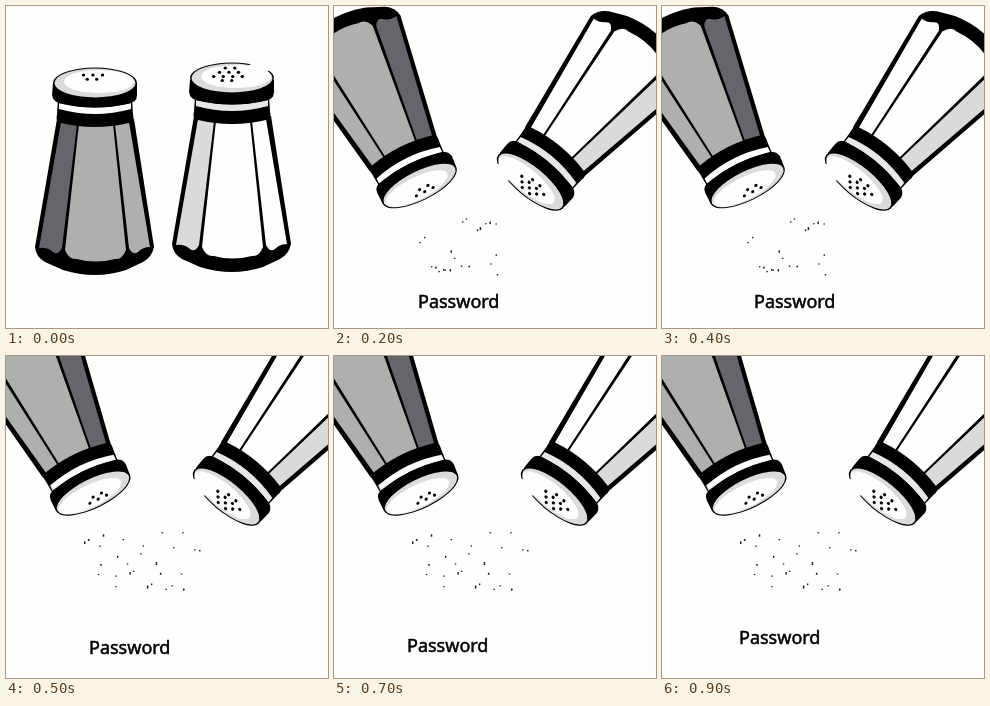
An HTML page with a canvas for the animation above (1 s loop, 322 px wide and 322 px high).

```html
<!DOCTYPE html>
<html lang="en">
<head>
<meta charset="utf-8">
<title>Salt and pepper</title>
<style>
html, body { margin: 0; width: 100%; height: 100%; overflow: hidden; background: #fefefc; }
canvas { display: block; }
</style>
</head>
<body>
<canvas id="stage" width="322" height="322"></canvas>
<script>
const ctx = document.getElementById('stage').getContext('2d');
const PAPER = '#fefefc';
const STEP = 100, STEPS = 10;

const pepper = { side: '#68646c', body: '#adb0ad', ring: PAPER, rows: [3, 2], top: -8 };
const salt = { side: '#d8dbd8', body: PAPER, ring: '#e6e8e6', rows: [2, 3, 4, 2], top: -12, worn: true };

// Each shaker: lid centre x, y, turn in degrees, scale.
const upright = { pepper: [89, 77, 0, 1], salt: [226, 74, 0, 1] };
const tipping = { pepper: [107.5, 183, 130, 0.98], salt: [190, 192.5, 231.5, 1] };
const low = {
  pepper: [85.5, 179.5, 153.5, 0.98], salt: [198, 174, 219.5, 1],
  grains: scatter(22, 7, 78, 98, 209, 62)
};
const high = {
  pepper: [87, 137, 154, 0.98], salt: [222, 139, 219.5, 1],
  grains: scatter(28, 3, 71, 127, 172, 72)
};

// Word position: step, x, baseline.
const wordKeys = [[1, 244, 294], [2, 84, 302], [4, 92, 302], [6, 73, 293], [8, 73, 299], [9, 77, 288]];

function random(seed) {
  return () => (seed = (seed * 16807) % 2147483647) / 2147483647;
}

// Grains spread evenly across, at random heights, drawing together as they fall.
function scatter(count, seed, left, width, top, height) {
  const rnd = random(seed * 7919);
  return Array.from({ length: count }, (_, i) => {
    const fall = rnd();
    const across = (i + rnd()) / count - 0.5;
    return {
      x: left + width * (0.5 + across * (1 - 0.25 * fall)),
      y: top + height * fall,
      h: 1.2 + 2 * rnd() ** 4
    };
  });
}

function fill(path, color) {
  ctx.fillStyle = color;
  ctx.fill(new Path2D(path));
}

function oval(x, y, rx, ry, color) {
  ctx.fillStyle = color;
  ctx.beginPath();
  ctx.ellipse(x, y, rx, ry, 0, 0, Math.PI * 2);
  ctx.fill();
}

function holes({ rows, top }) {
  rows.forEach((n, r) => {
    for (let i = 0; i < n; i++) {
      oval((i - (n - 1) / 2) * 9.5 - 2 - r, top + r * 4.2, 1.7, 1.5, '#000');
    }
  });
}

function shaker(kind, [x, y, deg, size]) {
  ctx.save();
  ctx.translate(x, y);
  ctx.rotate(deg * Math.PI / 180);
  ctx.scale(size, size);

  // Body
  fill('M-38 36L-60 164Q-59 174 -50 179L-32 187Q0 197 31 187L48 179Q57 174 59 164L39 36Z', '#000');
  fill('M-34 39L-18 41L-33 165Q-37 173 -42 169Q-48 164 -56 165Z', kind.side);
  fill('M-16 41L18 41L31 167Q27 177 20 176Q0 181 -18 176Q-26 177 -30 167Z', kind.body);
  fill('M20 41L34 39L55 164Q48 164 43 169Q38 173 34 165Z', kind.body);

  // Neck and lid
  fill('M-37 16L-38 31Q-40 40 -34 40Q0 48 34 40Q40 40 38 31L37 16Z', '#000');
  fill('M-36 20Q0 29 36 20L36 26Q0 36 -36 26Z', kind.ring);
  fill('M-42 0L-43 12Q-42 20 -32 21Q0 28 32 21Q42 20 42 12L42 0Z', '#000');
  const rise = kind.worn ? -2 : 0;
  oval(0, rise, 42, 15.5, '#000');
  oval(0, rise, 40.5, 14.4, '#dadcda');
  oval(4, rise - 1.5, 35, 11.5, PAPER);
  if (kind.worn) oval(27, -12, 11, 6, PAPER);
  holes(kind);
  ctx.restore();
}

function drawWord(step) {
  const next = wordKeys.findIndex(key => key[0] >= step);
  const [s1, x1, y1] = wordKeys[next];
  const [s0, x0, y0] = wordKeys[Math.max(0, next - 1)];
  const k = s1 > s0 ? (step - s0) / (s1 - s0) : 1;
  const x = Math.round(x0 + (x1 - x0) * k);
  const y = Math.round(y0 + (y1 - y0) * k);
  ctx.font = '18px "Noto Sans", "Open Sans", sans-serif';
  ctx.fillStyle = ctx.strokeStyle = '#000';
  ctx.lineWidth = 0.5;
  ctx.fillText('Password', x, y);
  ctx.strokeText('Password', x, y);
}

function draw(step) {
  const pose = step === 0 ? upright : step === 1 ? tipping : step % 2 ? high : low;
  ctx.fillStyle = PAPER;
  ctx.fillRect(0, 0, 322, 322);
  shaker(pepper, pose.pepper);
  shaker(salt, pose.salt);
  ctx.fillStyle = '#222';
  for (const { x, y, h } of pose.grains || []) ctx.fillRect(x, y, 1.5, h);
  if (step > 0) drawWord(step);
}

const start = performance.now();
function tick() {
  draw(Math.floor((performance.now() - start) / STEP) % STEPS);
  requestAnimationFrame(tick);
}
tick();
</script>
</body>
</html>
```
